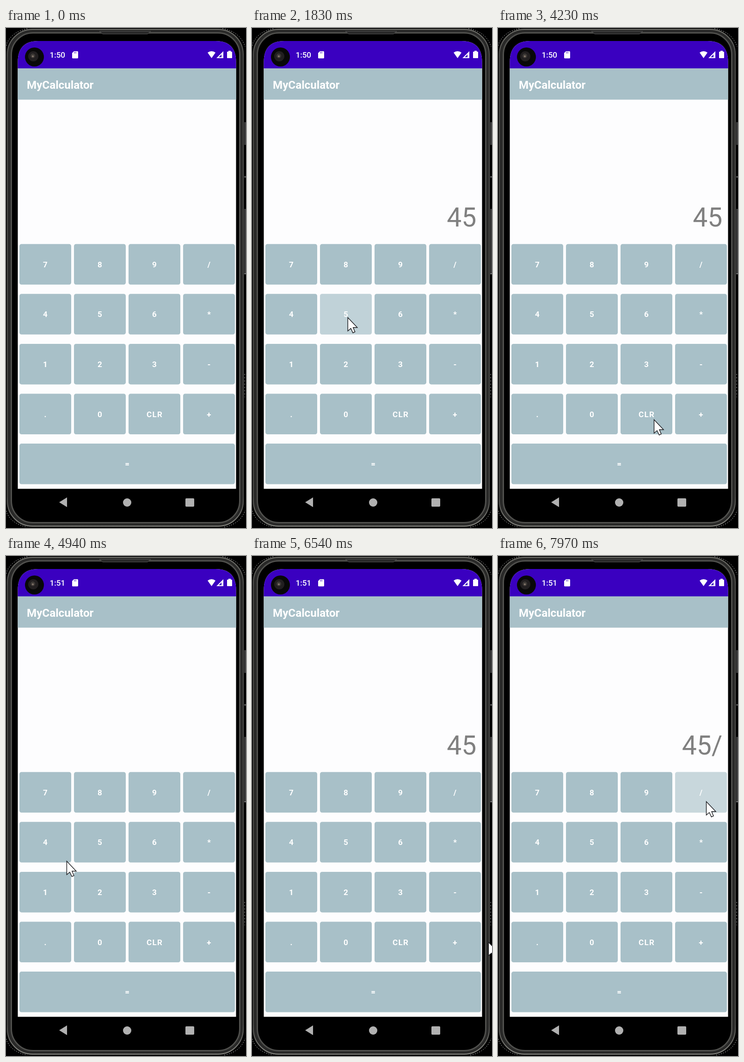
Write an HTML page that moves like this. It is 519x1078 px and loops after 8 s.

```html
<!DOCTYPE html>
<html lang="en">
<head>
<meta charset="utf-8">
<title>Calculator demo</title>
<style>
  html, body { margin: 0; width: 100%; height: 100%; overflow: hidden; background: #000; }
  svg { display: block; width: 100vw; height: 100vh; }
  text { font-family: Roboto, sans-serif; font-weight: 500; fill: #fff; }
  .key text { font-size: 17px; letter-spacing: 1.3px; text-anchor: middle; font-weight: 700; }
</style>
</head>
<body>
<svg viewBox="0 0 519 1078">
  <defs>
    <linearGradient id="edge" x2="0" y2="1">
      <stop offset="0" stop-color="#74746e"/>
      <stop offset=".06" stop-color="#4c4c49"/>
      <stop offset=".94" stop-color="#4c4c49"/>
      <stop offset="1" stop-color="#8a8a84"/>
    </linearGradient>
  </defs>

  <!-- Phone body -->
  <rect width="519" height="1078"/>
  <path d="M0 38Q10 8 48 1M468 1Q506 8 517 40M0 1041Q10 1069 46 1076M472 1076Q507 1069 517 1040"
        fill="none" stroke="#ddd" stroke-dasharray="2 3"/>
  <path d="M514 203h5v49h-5zM514 321h5v209h-5z" fill="#3c3c3c"/>
  <path d="M515 322h4v68h-4z"/>
  <path d="M515 321h4M515 530h4" stroke="#ccc"/>
  <path d="M516 746v50" stroke="#bbb" stroke-dasharray="2 5"/>
  <rect x="1" y="1" width="514" height="1075" rx="56" fill="#101010"/>
  <rect x="3" y="3" width="510" height="1071" rx="54" fill="#292928" stroke="url(#edge)" stroke-width="2"/>
  <rect x="11.500" y="10.500" width="494" height="1056" rx="47" stroke="#50504d" stroke-width="3"/>
  <path d="M202 7H313L306 13H209Z" fill="#282828" stroke="#555"/>

  <!-- Screen -->
  <path d="M25.500 993.500V72Q26 28 70 28H453Q497 28 497.500 72V993.500Z" fill="#fdfdfe"/>
  <path d="M25.500 87V72Q26 28 70 28H453Q497 28 497.500 72V87Z" fill="#3a00c0"/>
  <rect x="25.500" y="87" width="472" height="67.500" fill="#a8c0c8"/>
  <circle cx="61.500" cy="62.500" r="20.500" fill="#080808"/>
  <circle cx="59" cy="61" r="11" fill="#221f20"/>
  <circle cx="58" cy="60" r="5" fill="#3d3936"/>
  <circle cx="58" cy="61" r="2" fill="#85786c"/>
  <text id="clock" x="94.500" y="64" font-size="17"></text>
  <g fill="#fff">
    <path d="M147 50h7q2 0 2 2v12q0 1.500-2 1.500h-9q-2 0-2-1.500V54z"/>
    <path d="M436 53Q444.500 47 453 53L444.500 65Z"/>
    <path fill-rule="evenodd" d="M470 50V65H455ZM466 57V63H460Z"/>
    <path d="M481 51v-2h5v2h2q1 0 1 1v12q0 1-1 1h-9q-1 0-1-1v-12q0-1 1-1z"/>
  </g>
  <path d="M148 51v4M151 51v4" stroke="#3a00c0"/>
  <text x="45" y="130.500" style="font-size:24.200px;font-weight:700">MyCalculator</text>
  <text id="display" x="485.300" y="428" text-anchor="end"
        style="font-size:57px;font-weight:400;fill:#808080"></text>
  <g id="keys"></g>

  <!-- Navigation bar -->
  <g fill="#b1b1b1">
    <path d="M115 1022.500L132 1012V1033Z"/>
    <circle cx="262" cy="1023" r="9"/>
    <rect x="388" y="1014" width="19" height="18" rx="2"/>
  </g>

  <path id="cursor" d="M.5 .5V29.500L7 24L11.500 33.500L16 31.500L12 22H21Z"
        fill="#fff" stroke="#18181c" stroke-width="1.400"/>
</svg>
<script>
const LOOP = 8000;
const RELEASE = 100;
const CLOCK_TICK = 4920;
const byId = id => document.getElementById(id);

// time, x, y of the pointer tip
const path = [
  [330, -24, 700], [800, 94, 630], [980, 98, 628], [1200, 169, 632],
  [1380, 205, 622], [1970, 207, 624], [2730, 470, 822], [2870, 470, 822],
  [3100, 455, 810], [3270, 455, 810], [4070, 337, 844], [4500, 337, 844],
  [5080, 96, 626], [5350, 98, 624], [5700, 192, 615], [5990, 200, 617],
  [6540, 511, 832], [6700, 518, 820], [7420, 448, 534], [7700, 450, 529], [8000, 450, 529]
];
const presses = [[900, '4'], [1500, '5'], [4320, 'CLR'], [5220, '4'], [5880, '5'], [7820, '/']];
const glows = {};

function addElement(parent, tag, attributes) {
  const element = document.createElementNS('http://www.w3.org/2000/svg', tag);
  for (const name in attributes) element.setAttribute(name, attributes[name]);
  return parent.appendChild(element);
}

function addKey(label, column, row, width) {
  const x = 29 + column * 118, y = 465.7 + row * 107.6;
  const key = addElement(byId('keys'), 'g', { class: 'key' });
  const box = { x, y, width, height: 87.5, rx: 4.5 };
  addElement(key, 'rect', { ...box, fill: '#a8c0c8' });
  glows[label] = addElement(key, 'rect', { ...box, fill: '#fff', opacity: 0 });
  addElement(key, 'text', { x: x + width / 2 + .65, y: y + 50 }).textContent = label;
}

['7 8 9 /', '4 5 6 *', '1 2 3 -', '. 0 CLR +'].forEach((labels, row) =>
  labels.split(' ').forEach((label, column) => addKey(label, column, row, 112)));
addKey('=', 0, 4, 466);

const clamp = v => Math.max(0, Math.min(1, v));

function pointerAt(t) {
  const next = path.findIndex(point => point[0] > t);
  if (next < 1) return [-40, 700];
  const [t0, x0, y0] = path[next - 1], [t1, x1, y1] = path[next];
  const u = (t - t0) / (t1 - t0), eased = u * u * (3 - 2 * u);
  return [x0 + (x1 - x0) * eased, y0 + (y1 - y0) * eased];
}

// Quick rise, short hold, slow fade
const glowAt = age => .36 * Math.min(clamp(age / 80), clamp((600 - age) / 350));

function render(t) {
  let shown = '';
  for (const label in glows) glows[label].setAttribute('opacity', 0);
  for (const [start, label] of presses) {
    const age = t - start;
    if (age >= RELEASE) shown = label === 'CLR' ? '' : shown + label;
    if (age >= 0 && age < 600) glows[label].setAttribute('opacity', glowAt(age));
  }
  byId('display').textContent = shown;
  byId('clock').textContent = t < CLOCK_TICK ? '1:50' : '1:51';
  byId('cursor').setAttribute('transform', `translate(${pointerAt(t)})`);
}

const began = performance.now();
function tick() {
  render((performance.now() - began) % LOOP);
  requestAnimationFrame(tick);
}
tick();
</script>
</body>
</html>
```
